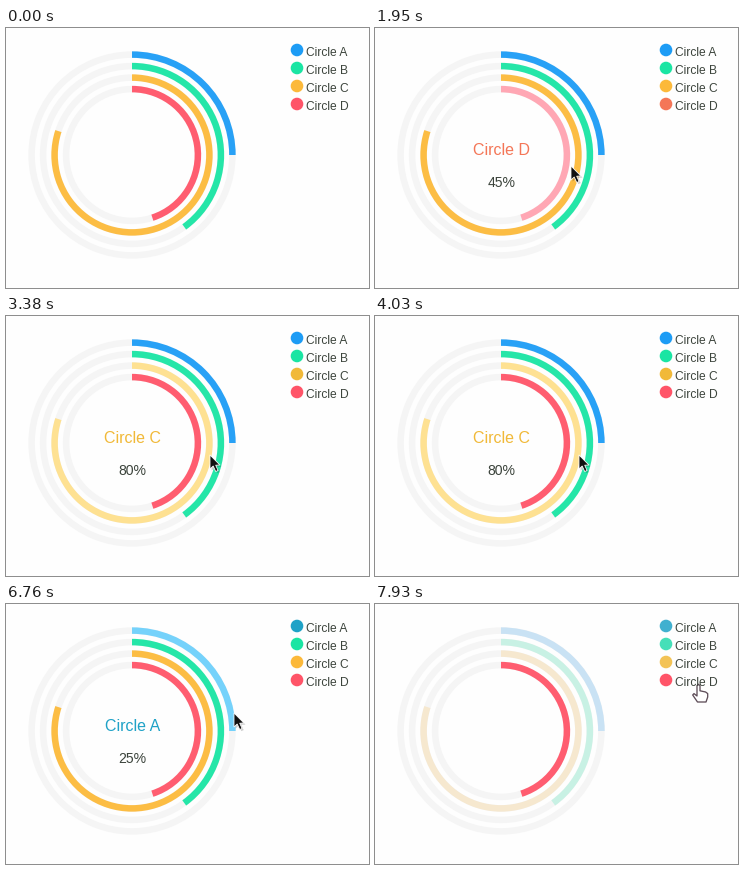
Animation, 363 px wide and 260 px high, one loop 8 s. Source, as a matplotlib script:

```python
import matplotlib.pyplot as plt
import numpy as np
from matplotlib.animation import FuncAnimation
from matplotlib.colors import to_rgb
from matplotlib.patches import Circle, Polygon, Wedge

W, H, DPI = 363, 260, 100
LOOP_MS, INTERVAL, STEP_MS = 8000, 40, 130
CX, CY = 126, 127
OUTER, SPACING, BAND = 100.4, 11.5, 6.5
PX = 72 / DPI  # one pixel in points

# name, percentage, colour, colour of title and key while hovered
RINGS = [
    ("Circle A", 25, "#1d9cf5", "#1fa2c7"),
    ("Circle B", 40, "#1ae5a3", "#24d9ac"),
    ("Circle C", 80, "#fcb93a", "#f1b938"),
    ("Circle D", 45, "#ff5468", "#f47657"),
]

# cursor stops: step of arrival, position, what it points at
ENTRY_STEP, ENTRY, MOVE_STEPS = 5, (204, 196), 4
LEGEND = "legend"
STOPS = [
    (9, (194, 141), None),
    (13, (196, 138), 3),
    (26, (204, 139), 2),
    (38, (216, 142), 1),
    (46, (228, 109), 0),
    (60, (324, 80), LEGEND),
]
LEGEND_RING = 3

ARROW = np.array([(0, 0), (0, 14), (3.2, 11), (5.7, 16.5), (8.1, 15.5),
                  (5.7, 10.2), (9.9, 10)])
FINGERTIP, KNUCKLES = [(-2, 1.6), (-0.5, 0.3), (1, 1.6), (1, 6.8)], [(6.6, 8), (8.7, 9.6)]
PALM_AND_THUMB = [(8.7, 13), (7, 18), (-1.5, 18), (-6.3, 11), (-5, 9.6), (-2, 12)]
HAND = np.array(FINGERTIP + KNUCKLES + PALM_AND_THUMB)

fig = plt.figure(figsize=(W / DPI, H / DPI), dpi=DPI, facecolor="#fefefe")
ax = fig.add_axes([0, 0, 1, 1])
ax.set_xlim(0, W)
ax.set_ylim(H, 0)
ax.axis("off")


def blend(color, other, amount):
    return (1 - amount) * np.array(to_rgb(color)) + amount * np.array(to_rgb(other))


def brighten(color):
    return np.array(to_rgb(color)) ** 0.42


def ease(t):
    t = np.clip(t, 0, 1)
    return t * t * (3 - 2 * t)


def label(x, y, text, size, align="left"):
    return ax.text(x, y, text, fontsize=size * PX, family="Liberation Sans",
                   color="#3c443c", ha=align, va="baseline")


def ring(radius, share, color):
    wedge = Wedge((CX, CY), radius + BAND / 2, -90, -90 + 3.6 * share,
                  width=BAND, facecolor=color, linewidth=0)
    return ax.add_patch(wedge)


def shape(points, face, edge, width):
    return ax.add_patch(Polygon(points, facecolor=face, edgecolor=edge,
                                linewidth=width * PX, joinstyle="round"))


arcs, dots = [], []
for i, (name, share, color, _) in enumerate(RINGS):
    radius, y = OUTER - SPACING * i, 22 + 18 * i
    ring(radius, 100, "#f5f5f5")
    arcs.append(ring(radius, share, color))
    dots.append(ax.add_patch(Circle((291, y), 6.3, facecolor=color, linewidth=0)))
    label(300.3, y + 6, name, 12)

title = label(CX + 0.2, 127, "", 16, "center")
percent = label(CX + 0.2, 159, "", 14, "center")
shadow = shape(ARROW, "#00000030", "none", 0)
arrow = shape(ARROW, "#111111", "white", 0.8)
hand = shape(HAND, "white", "#5d4c57", 1.3)


def pointer(step):
    """Return the cursor position and what it hovers."""
    tip, target = np.array(ENTRY, float), None
    for arrival, place, item in STOPS:
        progress = ease((step - arrival + MOVE_STEPS) / MOVE_STEPS)
        tip = tip + progress * (np.array(place) - tip)
        if progress >= 0.5:
            target = item
    return tip, target


def ring_colors(i, target):
    """Return the arc and key colours of a ring."""
    _, _, color, accent = RINGS[i]
    arc = blend(color, "white", 0.05)
    if target == i:
        return brighten(arc), accent
    if target == LEGEND and i != LEGEND_RING:
        return blend(color, "#f4f4f4", 0.8), blend(accent, "white", 0.15)
    return arc, color


def draw(frame):
    step = (frame * INTERVAL + INTERVAL - 1) // STEP_MS
    tip, target = pointer(step)

    for i, (arc, dot) in enumerate(zip(arcs, dots)):
        arc_color, dot_color = ring_colors(i, target)
        arc.set_facecolor(arc_color)
        dot.set_facecolor(dot_color)

    if target in (None, LEGEND):
        title.set_text("")
        percent.set_text("")
    else:
        name, share, _, accent = RINGS[target]
        title.set_text(name)
        title.set_color(accent)
        percent.set_text(f"{share}%")

    for patch, points, offset in ((arrow, ARROW, 0), (shadow, ARROW, 1.6), (hand, HAND, 0)):
        patch.set_xy(points + tip + offset)
    arrow.set_visible(step >= ENTRY_STEP and target != LEGEND)
    shadow.set_visible(arrow.get_visible())
    hand.set_visible(target == LEGEND)
    return [*arcs, *dots, title, percent, shadow, arrow, hand]


animation = FuncAnimation(fig, draw, frames=LOOP_MS // INTERVAL,
                          interval=INTERVAL, repeat=True, repeat_delay=0)
plt.show()
```
